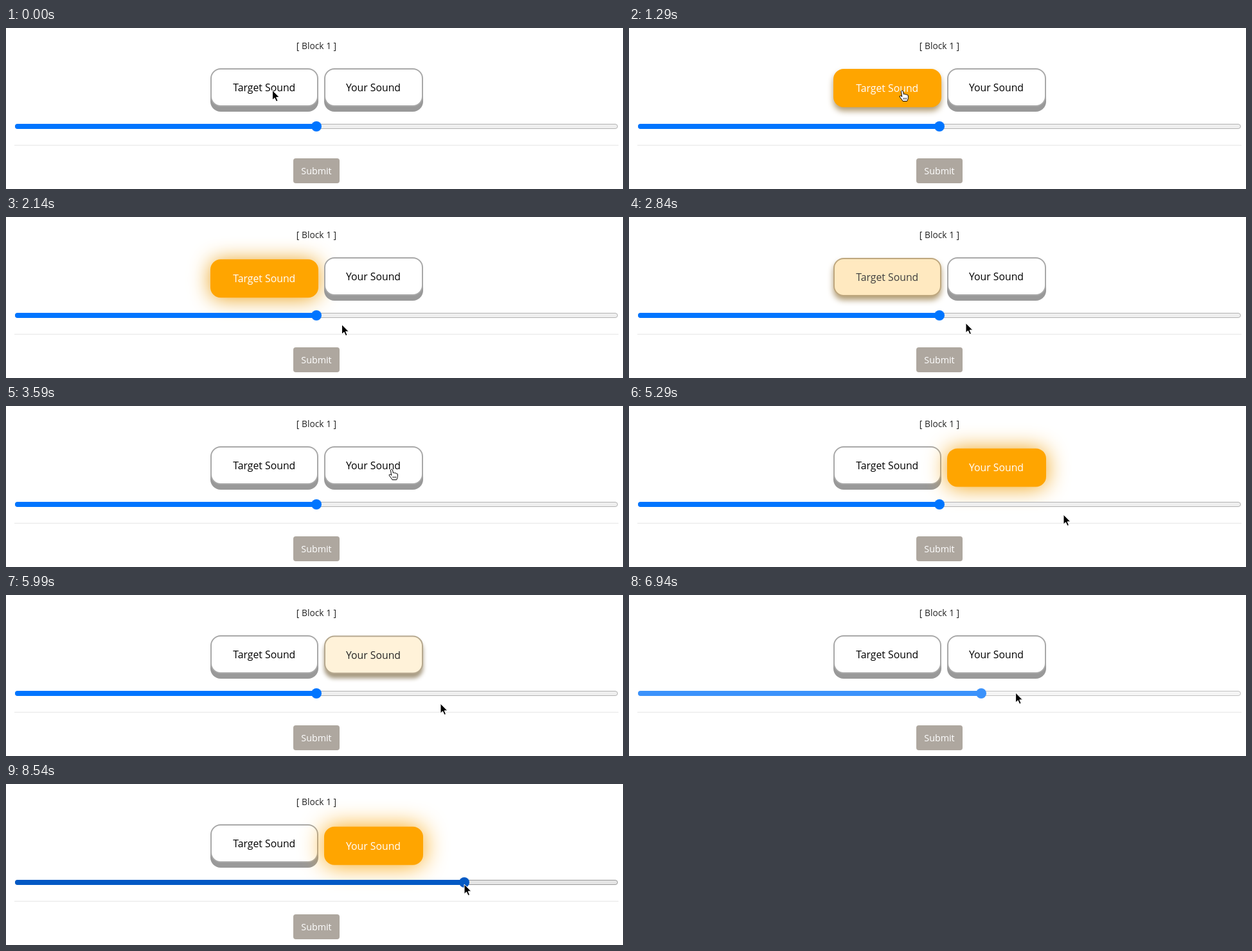
Write an HTML page that moves like this. It is 960 by 252 pixels and loops after 8740 ms.

```html
<!DOCTYPE html>
<html lang="en">
<head>
<meta charset="utf-8">
<title>Sound matching</title>
<style>
  html, body { margin: 0; width: 100%; height: 100%; overflow: hidden; background: #fff; }
  body { position: relative; font-family: "Open Sans", "Noto Sans", sans-serif; }
  body > * { position: absolute; box-sizing: border-box; }
  .centered { display: flex; align-items: center; justify-content: center; white-space: nowrap; }
  #title { left: 383px; top: 12px; width: 200px; height: 31px; font-size: 13.8px; color: #222; }
  .sound { top: 62.5px; height: 60px; border: 2px solid; border-radius: 16px; font-size: 15.8px; }
  #target { left: 317.5px; width: 168.5px; }
  #yours { left: 494.5px; width: 154px; }
  #track { left: 14px; top: 150px; width: 938px; height: 8px; border: 1px solid; border-radius: 4px; }
  #fill { left: 14px; top: 150px; height: 8px; border-radius: 4px 0 0 4px; }
  #thumb { top: 146px; width: 16px; height: 16px; border-radius: 50%; }
  #rule { left: 13px; top: 183px; width: 940px; height: 1px; background: #e6e6e6; }
  #submit { left: 447px; top: 204px; width: 72px; height: 39px; border-radius: 4px;
            background: #aea79f; color: #fff; font-size: 14.3px; }
  #pointer { left: 0; top: 0; width: 1px; height: 1px; overflow: visible; }
</style>
</head>
<body>
<div id="title" class="centered">[ Block 1 ]</div>
<div id="target" class="sound centered">Target Sound</div>
<div id="yours" class="sound centered">Your Sound</div>
<div id="track"></div>
<div id="fill"></div>
<div id="thumb"></div>
<div id="rule"></div>
<div id="submit" class="centered">Submit</div>
<svg id="pointer">
  <path id="arrow" d="M0 0V15.2L3.5 12L6 17.6L8.5 16.5L6.1 11H10.8Z" fill="#000" stroke="#fff"/>
  <g id="hand" stroke="#000" stroke-linejoin="round">
    <path fill="#fff" d="M-1.6 1.2Q0-1.4 1.5 1L2.4 5.8Q3.7 4.6 4.8 6Q6.3 5.2 7.2 6.7Q9 6.3 9.4 8L9.3 11.8Q9 14 7.7 16.5H1Q-.8 13-3.6 10.2Q-4.6 8.2-2.6 8Q-1.4 8.2-.3 9.6Z"/>
    <path fill="none" stroke-width=".8" d="M2.2 11.2V14M4.3 11.2V14M6.4 11.2V14"/>
  </g>
</svg>
<script>
const LOOP = 8740, FADE = 300, GLOW = 1500;
const PRESS = 6700, RELEASE = 7130, THUMB_LAG = 78;
const $ = id => document.getElementById(id);
const clamp = v => Math.min(1, Math.max(0, v));
const mix = (a, b, p) => a + (b - a) * p;
const mixColor = (a, b, p) => `rgb(${a.map((v, i) => mix(v, b[i], p)).join()})`;

const WHITE = [255, 255, 255], BLACK = [0, 0, 0], ORANGE = [255, 165, 0];
const BORDER = [168, 168, 168], BASE = [153, 153, 153];

// Equivalent to the CSS "ease" timing function.
function ease(x) {
  x = clamp(x);
  if (x === 0 || x === 1) return x;
  const curve = (a, b, s) => 3 * a * s * (1 - s) ** 2 + 3 * b * s * s * (1 - s) + s ** 3;
  let low = 0, high = 1;
  for (let i = 0; i < 20; i++) {
    const mid = (low + high) / 2;
    if (curve(.25, .25, mid) < x) low = mid; else high = mid;
  }
  return curve(.1, 1, low);
}

// Each run: highlight start, playback start, playback end.
const runs = {
  target: [[470, 930, 2705]],
  yours: [[3600, 4010, 5825], [RELEASE, RELEASE, Infinity]]
};

// Pointer path: time, x, y.
const path = [
  [40, 425, 98], [1500, 425, 98], [1790, 475, 147], [2050, 522, 169], [2400, 524, 166],
  [2950, 524, 166], [3200, 555, 150], [3540, 600, 99], [4200, 600, 99], [4440, 638, 125],
  [4650, 658, 150], [4860, 674, 172], [5000, 676, 170], [6050, 676, 170], [6350, 560, 164],
  [6600, 483, 155], [6770, 483, 155], [6940, 601, 153], [7120, 713, 157]
];

function pointerAt(t) {
  if (t < 40) return [414.5, 97.5];
  const next = path.findIndex(p => p[0] > t);
  if (next < 0) return path[path.length - 1].slice(1);
  const [t0, x0, y0] = path[next - 1], [t1, x1, y1] = path[next];
  const p = (t - t0) / (t1 - t0);
  return [mix(x0, x1, p), mix(y0, y1, p)];
}

function drawButton(id, t) {
  const run = runs[id].filter(r => t >= r[0]).pop();
  let tint = 0, glow = 0;
  if (run) {
    const [on, play, off] = run;
    const remaining = 1 - ease((t - off) / FADE);
    tint = ease((t - on) / FADE) * remaining;
    glow = clamp((Math.min(t, off) - play) / GLOW) * remaining;
  }
  const style = $(id).style;
  style.backgroundColor = mixColor(WHITE, ORANGE, tint);
  style.borderColor = mixColor(BORDER, ORANGE, tint);
  style.color = mixColor(BLACK, WHITE, tint);
  style.transform = `translateY(${4 * glow}px)`;
  style.boxShadow = `0 ${8 * (1 - glow)}px ${40 * glow}px ${mixColor(BASE, ORANGE, glow)}`;
}

function drawSlider(t, pointerY) {
  const dragging = t >= PRESS && t < RELEASE;
  const hovered = pointerY > 146 && pointerY < 162;
  const [blue, back, edge] = dragging ? ["#3b92fb", "#f5f5f5", "#c2c2c2"]
    : hovered ? ["#0259c4", "#e5e5e5", "#999"] : ["#0075ff", "#efefef", "#b2b2b2"];
  const x = t < PRESS + THUMB_LAG ? 483 : pointerAt(t - THUMB_LAG)[0];
  $("track").style.background = back;
  $("track").style.borderColor = edge;
  $("fill").style.width = x - 14 + "px";
  $("thumb").style.left = x - 8 + "px";
  $("fill").style.background = $("thumb").style.background = blue;
}

function draw() {
  const t = performance.now() % LOOP;
  const [x, y] = pointerAt(t);
  drawButton("target", t);
  drawButton("yours", t);
  drawSlider(t, y);
  const overButton = t >= 40 && y < 126;
  $("hand").style.display = overButton ? "" : "none";
  $("arrow").style.display = overButton ? "none" : "";
  $("pointer").style.transform = `translate(${x}px, ${y}px)`;
  requestAnimationFrame(draw);
}
draw();
</script>
</body>
</html>
```
